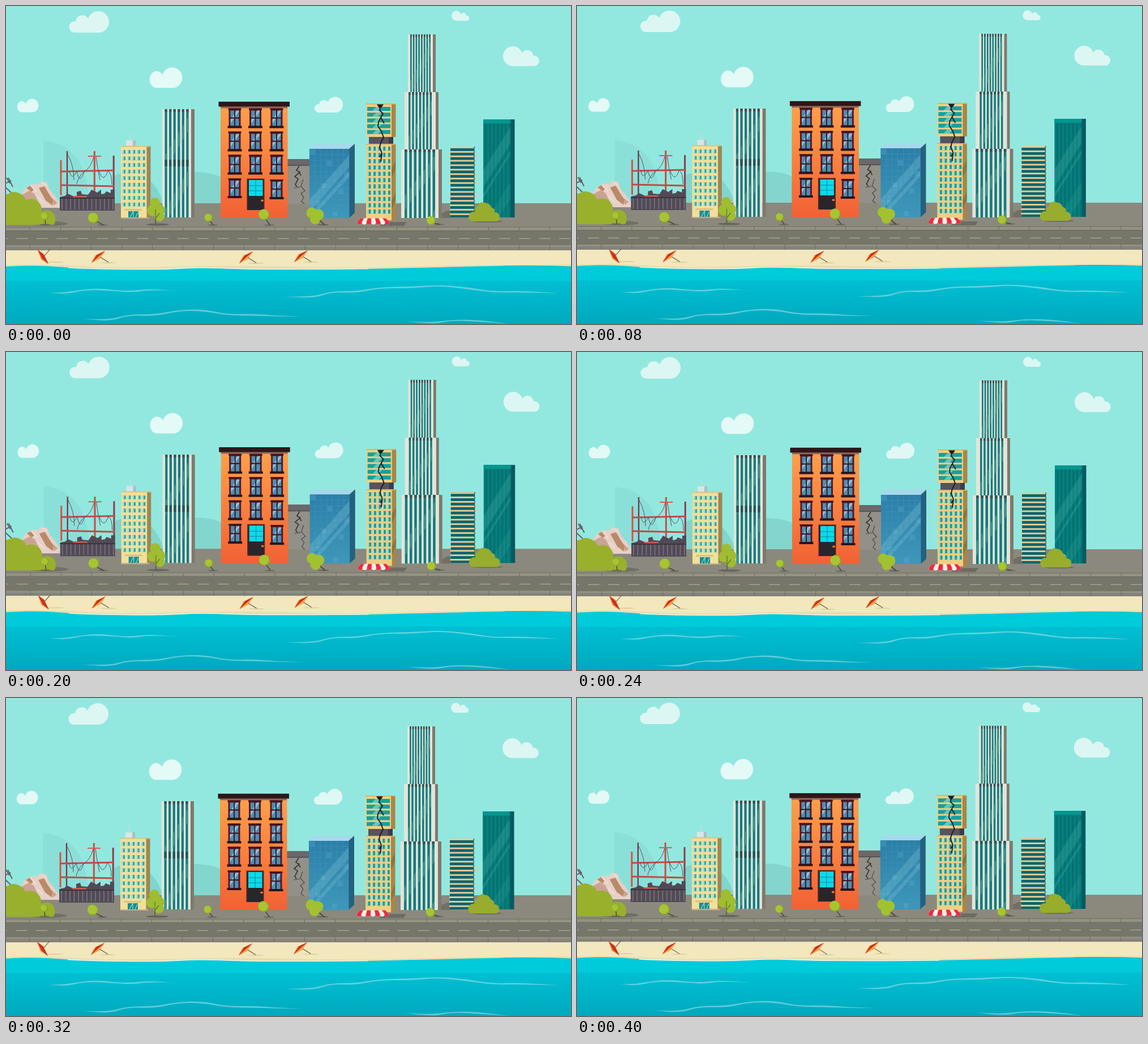
Write an HTML page with a canvas that moves like this. It is 998 px wide and 561 px high and loops after 440 ms.

```html
<!DOCTYPE html>
<html lang="en">
<head>
<meta charset="utf-8">
<title>Shaking city</title>
<style>
html, body { margin: 0; width: 100%; height: 100%; overflow: hidden; background: #92e8df; }
canvas { display: block; }
</style>
</head>
<body>
<canvas id="stage" width="998" height="561"></canvas>
<script>
const ctx = document.getElementById('stage').getContext('2d');
const STEP = 40;
// Camera offset for each step of the tremor
const shake = [[0, 0], [.3, -.7], [.4, -1], [.5, -1.1], [.6, -1], [.7, -.8],
  [1, 0], [0, 0], [-1, 0], [-.5, -.4], [-.2, -.9]];

const box = (c, x, y, w, h) => { ctx.fillStyle = c; ctx.fillRect(x, y, w, h); };
const fill = (c, d) => { ctx.fillStyle = c; ctx.fill(new Path2D(d)); };
const line = (c, w, d) => { ctx.strokeStyle = c; ctx.lineWidth = w; ctx.stroke(new Path2D(d)); };
const oval = (c, x, y, rx, ry = rx) => {
  ctx.fillStyle = c;
  ctx.beginPath();
  ctx.ellipse(x, y, rx, ry, 0, 0, 7);
  ctx.fill();
};
const fade = (y0, y1, a, b) => {
  const g = ctx.createLinearGradient(0, y0, 0, y1);
  g.addColorStop(0, a);
  g.addColorStop(1, b);
  return g;
};
function grid(c, x, y, cols, rows, dx, dy, w, h) {
  for (let i = 0; i < cols; i++)
    for (let j = 0; j < rows; j++) box(c, x + i * dx, y + j * dy, w, h);
}
function clipped(x, y, w, h, draw) {
  ctx.save();
  ctx.beginPath();
  ctx.rect(x, y, w, h);
  ctx.clip();
  draw();
  ctx.restore();
}

const LONG_CLOUD = 'M10 37A10 10 0 1 1 13 17A12 12 0 0 1 35 12A19 19 0 1 1 53 37Z';
const ROUND_CLOUD = 'M15 37A15.5 15.5 0 1 1 28 13A22 19 0 1 1 53 37Z';
function cloud(shape, x, y, w, h, flip, color = '#dcf6f3') {
  ctx.save();
  ctx.translate(flip ? x + w : x, y);
  ctx.scale((flip ? -w : w) / 72, h / 37);
  fill(color, shape);
  ctx.restore();
}

function sky() {
  box('#92e8df', -4, -4, 1006, 570);
  cloud(LONG_CLOUD, 110, 10, 72, 37);
  cloud(ROUND_CLOUD, 254, 109, 58, 35.5, false, '#e4faf7');
  cloud(ROUND_CLOUD, 20, 164, 38, 23.5, false, '#e2f9f6');
  cloud(LONG_CLOUD, 544, 161, 51, 27, false, '#e0f8f5');
  cloud(LONG_CLOUD, 787, 9, 32, 17, true);
  cloud(LONG_CLOUD, 878, 72, 65, 34, true);
  fill('#8ae0d9', 'M66 238Q99 240 118 260Q143 284 148 349H66Z');
  fill('#81d5cd', 'M190 349V300Q225 284 250 304Q270 320 278 349Z');
  fill('#83d6ce', 'M333 349V293Q362 292 385 304V349Z');
}

function street() {
  box('#8b897d', -4, 348, 1006, 44);
  box('#7f7d72', -4, 389, 1006, 2);
  box('#949382', -4, 391, 1006, 5);
  box('#66655c', -4, 396, 1006, 1.5);
  box('#77766a', -4, 397, 1006, 26);
  box('#929182', -4, 422, 1006, 3);
  box('#84837a', -4, 425, 1006, 6);
  for (let x = -12; x < 1002; x += 54) {
    box('#6c6b61', x, 390, 1, 6);
    box('#6c6b61', x, 422, 1, 8);
  }
  for (let x = -17; x < 1002; x += 35.5) box('#aaa997', x, 409.6, 20, 1.3);
}

// Thin smooth ribbon through the given points, swelling and narrowing on the way
function ripple(...pts) {
  const trace = side => side.map(([x, y], i) => {
    const [nx, ny] = side[i + 1] || [x, y];
    return `Q${x} ${y} ${(x + nx) / 2} ${(y + ny) / 2}`;
  }).join('');
  const last = pts.length - 1;
  const under = pts.map(([x, y], i) => [x, y + (i % last ? 1.6 + i % 2 * 1.6 : 0)]).reverse();
  fill('rgba(190,236,238,.5)', `M${pts[0]}${trace(pts)}${trace(under)}Z`);
}

function sea() {
  box('#f2e7bd', -4, 431, 1006, 40);
  fill('#e9dcae', 'M-4 457Q70 455 130 459T300 460T500 460T700 460T1002 456V470H-4Z');
  const edge = 'M-4 460C40 457 70 458 105 461S200 465 250 465S310 462 345 462S410 465 460 464.5C600 465 650 464 720 462C810 460 870 458 930 458Q970 458 1002 460';
  fill('#00cbdb', edge + 'V565H-4Z');
  line('#e6f7e4', 1.6, 'M110 461.5C150 464 200 464.5 250 464.5S310 461.7 345 461.7S410 464.5 460 464.2Q560 464.6 640 463.5');
  line('#0ab2c4', .8, 'M880 458.6Q930 457.5 998 459.8');
  box(fade(485, 561, '#00bfd3', '#00a9be'), -4, 485, 1006, 80);
  ripple([76, 506], [108, 505], [135, 500], [165, 498], [200, 502], [225, 502], [255, 499], [304, 503]);
  ripple([493, 513], [545, 512], [575, 503], [620, 503], [660, 496], [715, 495], [765, 492], [815, 496], [860, 504], [905, 502], [980, 507]);
  ripple([133, 552], [185, 553], [215, 544], [265, 544], [305, 536], [350, 535], [390, 544], [440, 543], [475, 546], [527, 548]);
  ripple([705, 556], [755, 558], [790, 553], [840, 554], [890, 561]);
}

function ruins() {
  line('#65606a', 2, 'M-4 317L12 332M1 303L7 313M-3 314L9 308M4 303L12 319');
  fill('#e6d0c7', 'M28 356V330L34 321L46 314L56 315L61 309L72 311L77 324L85 333L96 349V356Z');
  fill('#c8a492', 'M28 333L41 326L50 331L57 345L60 356H28ZM80 338L91 347L84 352Z');
  fill('#b98a68', 'M58 321L68 318L75 330L83 342L82 352L70 343ZM36 321L43 317L49 324L45 328Z');
  line('#f1e1d9', 2, 'M44 317L54 328M64 312L72 317M55 336L66 347');
  // Burnt steel frame
  box('#d95245', 95.5, 272, 3, 62);
  box('#703e4b', 106.8, 256, 2.4, 80);
  box('#c74d46', 154.8, 256, 3, 75);
  box('#8a3d49', 188.7, 264, 3, 66);
  line('#c14a46', 3, 'M96 292L192 290M97 316L191 318');
  line('#dc5b4b', 2, 'M145 265H168');
  line('#62505d', 1, 'M109 262Q120 282 120 307M112 291Q116 310 125 291Q130 318 139 290M155 266Q150 286 138 292Q127 302 125 314M159 266Q162 289 166 307M164 291Q172 314 180 291Q187 295 187 315');
  fill('#514a56', 'M95 337L104 335L109 331L118 335H125V328L132 326L134 332L145 333L151 324L161 329L168 324V332L174 331L177 327L185 330V324H192V361H95Z');
  box('#d65a49', 118, 335, 25, 2.5);
  for (let x = 98; x < 190; x += 7.5) box('#746d75', x, 340, 2, 19);
  box('#39343f', 95, 338, 97, 2);
}

function beigeBlock() {
  box('#d8e5e6', 212, 237, 17, 10);
  box('#aabec3', 224, 237, 5, 10);
  line('#c9dcdf', 1.4, 'M219 225V238');
  box('#9d8756', 248, 247, 7.5, 127);
  box('#f2df9c', 203, 247, 45.5, 128);
  box('#d8c47e', 203, 246.5, 52, 2);
  grid('#2cabaa', 205.5, 254, 5, 9, 8.6, 11.6, 5.6, 6.6);
  grid('#b8e5d0', 205.5, 254, 5, 9, 8.6, 11.6, 2.2, 6.6);
  box('#d9c480', 209, 358, 31, 3);
  box('#1b8b91', 216, 362, 18, 13);
  line('#8cdbd0', 1.2, 'M225 362V375M219 373L225 362M228 375L233 364');
  box('#bcb08e', 203, 373, 50, 2);
}

// White-ribbed glass tower section with a shaded right wall
function ribbed(x, y, w, h, side, bars, margin) {
  const inner = w - side - margin * 2, pitch = inner / (bars - .45);
  box('#7e796d', x + w - side, y, side, h);
  box('#e4e4d9', x, y, w - side, h);
  for (let i = 0; i < bars; i++) {
    const bx = x + margin + i * pitch, bw = pitch * .55;
    box('#127b7e', bx, y, bw, h);
    box('#315459', bx, y, bw, 5);
    clipped(bx, y + 5, bw, h - 5, () => {
      for (let top = y + 20; top < y + h; top += 95)
        fill('#38958f', `M${x} ${top + 70}L${x + w} ${top - 25}V${top}L${x} ${top + 95}Z`);
    });
  }
  return { pitch, left: x + margin };
}

function towers() {
  const { pitch, left } = ribbed(276, 182, 57, 191, 6, 6, 4.5);
  grid('#1d565b', left, 271, 6, 1, pitch, 0, pitch * .55, 12);
  ribbed(710, 50, 49, 103, 5, 8, 4);
  ribbed(704, 152, 60, 102, 5, 7, 7);
  ribbed(698, 253, 72, 121, 6, 7, 6);
}

function greyBlock() {
  box('#929087', 497, 270, 40, 79);
  box('#6a686a', 497, 270, 40, 11);
  box('#55545a', 497, 280, 40, 2);
  line('#38363a', 1.7, 'M518 282L513 290L519 293L510 301L516 305L511 315L514 319M517 292L521 299');
  line('#4c4a4b', 1.2, 'M525 306L521 318L528 326L521 331L526 337L522 345L527 349M509 321L520 319');
}

function houseWindow(x, y) {
  box('#5b1726', x, y, 21, 33);
  box('#3f1420', x - 1, y, 23, 3);
  box('#4b8fb4', x + 3, y + 4, 15, 27);
  clipped(x + 3, y + 4, 15, 27, () =>
    fill('#91bfd5', `M${x + 3} ${y + 20}L${x + 15} ${y + 3}H${x + 20}L${x + 3} ${y + 27}Z`));
  box('#3c1723', x + 9.5, y + 3, 2, 29);
  box('#3c1723', x + 2, y + 16, 17, 2.2);
  box('#2a1419', x - 2, y + 31, 25, 4);
}

function orangeHouse() {
  box(fade(180, 373, '#ff9f4a', '#f26134'), 379, 177, 118.5, 196.5);
  box('#8f6558', 379, 177.5, 118, 2.8);
  box('#2d1719', 375.5, 168.8, 125.5, 8.7);
  for (const x of [393.5, 430, 467.5])
    for (let row = 0; row < 3; row++) houseWindow(x, 180.5 + row * 41);
  houseWindow(393.5, 304);
  houseWindow(467.5, 306);
  box('#632125', 425.5, 304.5, 31, 55.5);
  box('#28262b', 427, 306, 28, 54);
  box('#0adbea', 429, 307, 24.5, 28);
  line('#1186a0', 1, 'M441 307V335M429 317H453.5M429 326H453.5');
  oval('#ff7a30', 452.5, 343.3, 2.4, 1.8);
}

function blueBlock() {
  fill('#a5d9eb', 'M536 252L544 243H616L606 252Z');
  fill('#24607f', 'M606 252L616 243V365L606 374Z');
  box(fade(252, 374, '#2a7fa8', '#3d98ba'), 536, 252, 70.5, 122);
  clipped(536, 252, 70, 122, () => {
    for (let i = 0; i < 7; i++) {
      const [x, y] = [537 + (i * 5 % 7) * 10, 253 + (i * 7 % 12) * 10];
      box('rgba(110,185,212,.25)', x, y, 9, 9);
    }
    fill('rgba(125,191,215,.35)', 'M536 342L606 263V284L536 363ZM536 370L606 292V302L540 374H536Z');
    for (let x = 546; x < 606; x += 10) line('#4593b5', .7, `M${x} 252V374`);
    for (let y = 262; y < 374; y += 10) line('#4593b5', .7, `M536 ${y}H606`);
  });
}

function crackedTower() {
  box('#58545d', 641, 230, 43, 14);
  box('#3f3c46', 676, 230, 8, 14);
  for (const [y, h] of [[172, 59], [243, 135]]) {
    box('#aa8546', 680.5, y, 8, h);
    box('#f0cf83', 636, y, 45, h);
    box('#d5b365', 636, y, 52, 1.7);
  }
  for (let y = 178; y < 226; y += 10.2) {
    box('#16a09f', 638, y, 41, 7);
    fill('#67c7bb', `M647 ${y + 7}L654 ${y}H664L657 ${y + 7}Z`);
  }
  grid('#1b9b9c', 638.5, 248, 5, 11, 8.6, 11.1, 6, 7.3);
  grid('#b8e3cc', 638.5, 248, 5, 11, 8.6, 11.1, 2, 7.3);
  fill('#92723f', 'M681 286L688 274V288L681 303ZM681 343L688 329V343L681 359Z');
  fill('#1d1a20', 'M655 173.5H667L664 178L661 181L658 178Z');
  line('#1d1a20', 1.9, 'M661 178L660 184L666 190L662 197L658 204L657 212L663 221L667 232L662 241L660 249L664 260L662 275M662 197L668 207M664 260L660 267');
  fill('#6d6c63', 'M669 381H708L703 388H660Z');
  // Striped awning
  ctx.save();
  ctx.beginPath();
  ctx.moveTo(626, 374.5);
  ctx.lineTo(671, 374.5);
  ctx.lineTo(678, 382);
  for (let i = 0; i < 7; i++) ctx.arc(673.7 - i * 8.2, 381.5, 4.1, 0, Math.PI);
  ctx.closePath();
  ctx.clip();
  box('#f4f1e7', 619, 374, 60, 13);
  for (let i = 0; i < 7; i += 2) {
    const x = 620.5 + i * 8.2, top = 626 + i * 6.45;
    fill('#ef2941', `M${top} 374H${top + 6.4}L${x + 8.2} 381V387H${x}V381Z`);
  }
  ctx.restore();
}

function rightBlocks() {
  fill('#716f66', 'M770 366L779 361H785V374H770Z');
  box('#08646c', 785, 248, 42.5, 125);
  for (let y = 248; y < 373; y += 7.85) {
    box('#e2cb97', 784, y, 43, 3);
    box('#927e55', 826, y, 2.5, 3);
  }
  box('#055a61', 890.5, 200, 8, 173);
  box('#058080', 843, 200, 48, 173);
  box('#06958f', 843, 200, 48, 7);
  for (let x = 846; x < 889; x += 7) box('#06716f', x, 208, 3.5, 165);
  clipped(843, 207, 48, 166, () => {
    fill('rgba(79,184,174,.25)', 'M843 290L891 213V243L843 320ZM843 332L891 255V262L843 339Z');
    fill('rgba(79,184,174,.15)', 'M852 373L891 310V340L871 373Z');
  });
}

function tree(x, y, r, tx, ty) {
  oval('#6c6b61', tx - 1, ty + .5, 9, 1.3);
  line('#4a443b', 1.5, `M${x} ${y + r * .4}L${tx} ${ty}`);
  oval('#8ba62c', x, y, r);
  oval('#a7c532', x - 1, y - .7, r - 1);
}

function plants() {
  oval('#717066', 75, 384, 34, 4);
  fill('#99b02d', 'M-4 386V331Q2 333 5 331Q14 325 25 331Q34 336 35 342Q52 337 60 349Q65 357 62 363Q77 357 85 367Q90 379 84 386Z');
  tree(68.5, 371, 6.7, 70, 385);
  tree(154.5, 374, 9.5, 172, 386);
  oval('#66655c', 268, 385.5, 20, 2);
  line('#5a513a', 1.8, 'M264 363V386M264 376L271 366M264 372L257 363');
  for (const [x, y, r] of [[263, 347, 9], [259, 361, 10], [270, 360, 10.5], [271, 371, 9]])
    oval('#9fbd31', x, y, r);
  line('#637332', 1.3, 'M264 359V386M264 375L271 366');
  tree(358, 373.5, 7.3, 366, 386);
  tree(456, 368, 9.7, 466, 386);
  oval('#66655c', 560, 386, 10, 1.3);
  line('#50483a', 2, 'M545 371L563 386');
  for (const [x, y, r] of [[540, 365, 9.5], [552, 368, 9.5], [546, 376, 9]])
    oval('#a2c130', x, y, r);
  tree(751, 378.5, 8, 766, 385);
  oval('#6e6d63', 850, 380, 27, 2);
  fill('#98ad2d', 'M822 380Q814 374 819 367Q823 361 829 364Q827 355 834 353Q836 344 846 347Q855 348 857 355Q865 358 863 364Q872 364 872 373Q873 378 867 380Z');
}

function parasol(x, y) {
  ctx.save();
  ctx.translate(x, y);
  oval('#ddcf9f', 18, 11, 14, 1);
  line('#5b5148', 1.1, 'M0 -1L18 10');
  fill('#dc4224', 'M-12 11L-5 -2L12 -10L3 3Z');
  fill('#f5a53e', 'M-12 11L-5 -2L-3 -2ZM-12 11L12 -10L3 3Z');
  fill('#c42f26', 'M-12 11L-2 -3L12 -10L0 0Z');
  ctx.restore();
}

function parasols() {
  oval('#ddcf9f', 86, 452, 16, 1);
  line('#5b5148', 1.1, 'M64 445L78 429');
  fill('#dc4224', 'M56 430L67 438L75 455L62 447Z');
  fill('#f5a53e', 'M56 430L62 447L64 447ZM62 447L75 455L64 446Z');
  fill('#c42f26', 'M56 430L66 440L75 455L65 446Z');
  parasol(163, 442);
  parasol(424, 443);
  parasol(521, 441);
}

const layers = [sky, street, sea, ruins, beigeBlock, towers, greyBlock, orangeHouse,
  blueBlock, crackedTower, rightBlocks, plants, parasols];

let start;
function tick(now) {
  start ??= now;
  const [dx, dy] = shake[Math.floor((now - start) / STEP) % shake.length];
  ctx.setTransform(1, 0, 0, 1, dx, dy);
  for (const draw of layers) draw();
  requestAnimationFrame(tick);
}
requestAnimationFrame(tick);
</script>
</body>
</html>
```
